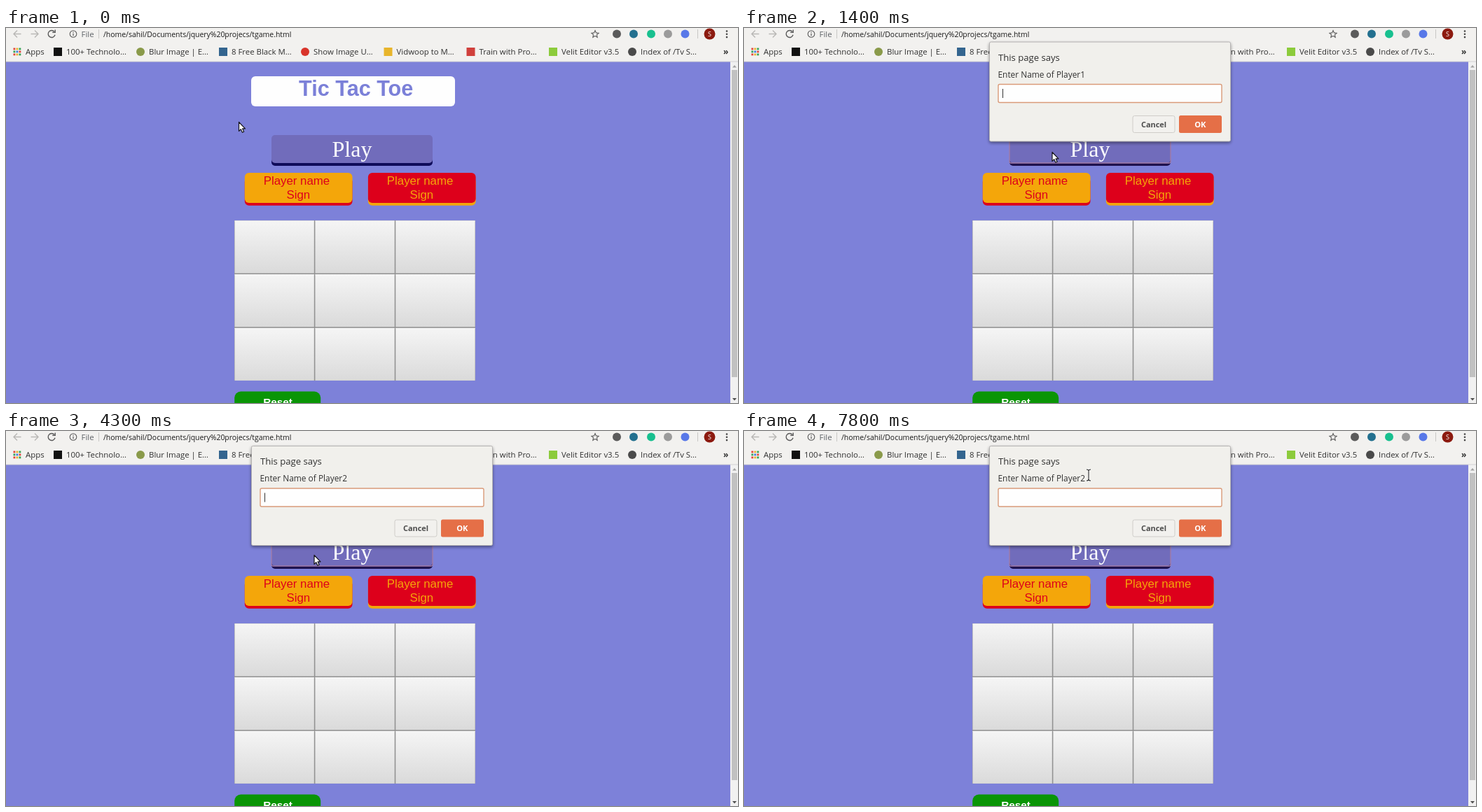
Recreate the animation shown at these times as an HTML page. Size 1045 by 536 pixels, loop 8000 ms.

```html
<!DOCTYPE html>
<html lang="en">
<head>
<meta charset="utf-8">
<title>Tic Tac Toe</title>
<style>
  html, body { margin: 0; width: 100%; height: 100%; overflow: hidden; background: #7d81d9; }
  svg { display: block; width: 100%; height: 100%; }
  text { white-space: pre; }
  .ui { font-family: "Open Sans", "Noto Sans", sans-serif; font-size: 11.4px; fill: #303030; }
  .sans { font-family: "Liberation Sans", Arial, sans-serif; }
  .serif { font-family: "Liberation Serif", Times, serif; }
  .mid { text-anchor: middle; }
  .bold { font-weight: 700; }
  .line { fill: none; stroke: #5a5a5a; stroke-width: 1.4; }
</style>
</head>
<body>
<svg viewBox="0 0 1045 536" preserveAspectRatio="none">
  <defs>
    <linearGradient id="cell" x2="0" y2="1">
      <stop stop-color="#f5f5f5"/><stop offset="1" stop-color="#dadada"/>
    </linearGradient>
    <filter id="soft" x="-5%" y="-10%" width="110%" height="125%">
      <feGaussianBlur stdDeviation="2"/>
    </filter>
  </defs>

  <!-- page -->
  <rect width="1045" height="536" fill="#7d81d9"/>
  <rect x="350" y="69" width="291" height="43" rx="6" fill="#fefefe"/>
  <text class="sans bold mid" x="499.7" y="97" font-size="30.6" fill="#7b80d8">Tic Tac Toe</text>

  <rect id="edge" x="379" y="160" width="230" height="37" rx="5"/>
  <rect x="379" y="153" width="230" height="40" rx="5" fill="#716cbb"/>
  <rect id="ring" x="379" y="153" width="230" height="40" rx="2" fill="none" stroke="#a17ca9" stroke-width="1.4"/>
  <text class="serif mid" x="494" y="184" font-size="32" fill="#fff">Play</text>

  <g id="cards"></g>
  <g id="board"></g>

  <rect x="326.2" y="519.6" width="123" height="40" rx="9" fill="#0a9506"/>
  <text class="sans bold mid" x="388" y="539.5" font-size="15.3" fill="#fff">Reset</text>

  <!-- scrollbar -->
  <rect x="1034" y="48" width="11" height="488" fill="#f1f1f1"/>
  <rect x="1036" y="60" width="8" height="439" fill="#c1c1c1"/>
  <path d="M1037 56.5h6l-3-3.4z" fill="#a3a3a3"/>
  <path d="M1037 529h6l-3 3.4z" fill="#505050"/>

  <!-- browser bars -->
  <rect width="1045" height="48" fill="#f2f1ef"/>
  <rect y="47.5" width="1045" height="1" fill="#d3d1d4"/>
  <g class="line">
    <path d="M21.5 8.5H11.5M16 3.5l-5 5 5 5M35.5 8.5H45.5M41 3.5l5 5-5 5" stroke="#b9b8b6"/>
    <path d="M69 5.2a5 5 0 1 0 1 4.6M70.2 2.4v4h-4"/>
    <circle cx="96" cy="8.5" r="4.8" stroke-width="1.1"/>
    <path d="M96 7.8v3.4M96 5.4v1.3" stroke-width="1.2"/>
    <path d="M132.5 2v13M987.5 2v13" stroke="#c8c7c5" stroke-width="1"/>
    <path d="M841 3.6l1.5 3.3 3.6.4-2.7 2.4.8 3.6-3.2-1.9-3.2 1.9.8-3.6-2.7-2.4 3.6-.4z" stroke-width="1.1"/>
  </g>
  <text class="ui" x="107.5" y="12.5" style="fill:#5f6368">File</text>
  <text class="ui" x="139" y="12.5" style="font-size:10.45px;fill:#1a1a1a">/home/sahil/Documents/jquery%20projecs/tgame.html</text>
  <g id="tools"></g>
  <text class="ui mid" x="1004.5" y="11.8" style="font-size:9px;fill:#fff">S</text>
  <g fill="#444"><circle cx="1029" cy="4.5" r="1.3"/><circle cx="1029" cy="8.8" r="1.3"/><circle cx="1029" cy="13.1" r="1.3"/></g>
  <g id="marks"></g>
  <text class="ui bold" x="1024" y="37.5" style="font-size:12px">»</text>

  <!-- prompt -->
  <g id="dialog">
    <rect x="350" y="23" width="345" height="143" rx="3" fill="#000" opacity=".42" filter="url(#soft)"/>
    <rect x="350.5" y="21.5" width="344" height="142" rx="2" fill="#f1f0ec" stroke="#b5b3b3"/>
    <text class="ui" x="363" y="48" style="font-size:13.1px">This page says</text>
    <text class="ui" id="ask" x="362.5" y="72" style="font-size:11.9px"></text>
    <rect x="363" y="82" width="319" height="26" rx="2" fill="#fefefe" stroke="#d99a79" stroke-width="1.4"/>
    <text class="ui" id="typed" x="369" y="99" style="font-size:10.8px"></text>
    <rect id="caret" y="88.5" width="1" height="13" fill="#333"/>
    <rect x="555" y="127" width="60" height="24" rx="2.5" fill="#f2f1ee" stroke="#cfcdc9"/>
    <text class="ui bold mid" x="585" y="143" style="font-size:10.9px;fill:#4c4c4c">Cancel</text>
    <rect x="621" y="126.5" width="61" height="25" rx="2.5" fill="#e56f47"/>
    <text class="ui bold mid" x="651.3" y="143" style="font-size:11.2px;fill:#fff">OK</text>
  </g>

  <path id="arrow" d="M.5 .5V13.4L3.3 10.7L5.4 15.3L7.6 14.3L5.6 9.8H9.5Z" fill="#fff" stroke="#15151c" stroke-width="1.2" stroke-linejoin="round"/>
  <g id="beam" fill="none">
    <path d="M-3-8q3 0 3 2V6q0 2-3 2M3-8q-3 0-3 2M3 8q-3 0-3-2" stroke="#fff" stroke-width="2.4"/>
    <path d="M-3-8q3 0 3 2V6q0 2-3 2M3-8q-3 0-3 2M3 8q-3 0-3-2" stroke="#222" stroke-width="1.1"/>
  </g>
</svg>
<script>
const $ = id => document.getElementById(id);
const LOOP = 8000;

const rect = (x, y, w, h, fill, rx = 0) =>
  `<rect x="${x}" y="${y}" width="${w}" height="${h}" rx="${rx}" fill="${fill}"/>`;
const dot = (x, y, r, fill) => `<circle cx="${x}" cy="${y}" r="${r}" fill="${fill}"/>`;
const label = (x, y, s, fill) =>
  `<text class="sans mid" x="${x}" y="${y}" font-size="16.83" fill="${fill}">${s}</text>`;

const card = (x, face, ink) =>
  rect(x, 213.7, 153.7, 40, ink, 6) + rect(x, 206.9, 153.7, 43, face, 6) +
  label(x + 74.2, 224, "Player name", ink) + label(x + 76.5, 244, "Sign", ink);
$("cards").innerHTML = card(340.8, "#f4a60a", "#dd001b") + card(516.9, "#dd001b", "#f4a60a");

let cells = rect(326, 275, 344, 229, "#929292");
for (let i = 0; i < 9; i++) {
  const x = 326.5 + (i % 3) * 114.9, y = 275.5 + Math.floor(i / 3) * 76.7;
  cells += rect(x, y, 113.3, 75, "url(#cell)") + rect(x, y, 113.3, 1, "#fafafa");
}
$("board").innerHTML = cells;

$("tools").innerHTML = [
  [872, "#5b5b5b"], [896, "#23708f"], [921, "#18c08f"], [945, "#9b9b9b"], [969.5, "#5878e8"]
].map(([x, c]) => dot(x, 8.5, 6, c)).join("") + dot(1004.5, 8.5, 8, "#8c1a0f");

const round = (x, c) => dot(x, 34, 6, c);
const square = (x, c) => rect(x - 6, 28, 12, 12, c);
const marks = [
  [86, "100+ Technolo…", "#111", square], [204, "Blur Image | E…", "#8a9a4a", round],
  [322, "8 Free Black M…", "#34658f", square], [439, "Show Image U…", "#d9342b", round],
  [557.5, "Vidwoop to M…", "#e8b52c", square], [675.5, "Train with Pro…", "#d0403c", square],
  [793, "Velit Editor v3.5", "#8ccb3c", square], [906, "Index of /Tv S…", "#4a4a4a", round]
];
const hues = ["#e2463a", "#3d7de0", "#36a457", "#e9b32c"];
let bar = `<text class="ui" x="28" y="38">Apps</text>`;
for (let i = 0; i < 9; i++)
  bar += rect(10.5 + (i % 3) * 4, 28.5 + Math.floor(i / 3) * 4, 2.8, 2.8, hues[(i * 3 + (i / 3 | 0)) % 4]);
for (const [x, s, c, icon] of marks)
  bar += icon(x - 12, c) + `<text class="ui" x="${x}" y="38">${s}</text>`;
$("marks").innerHTML = bar;

// Each step: start time, then the values held from there on.
const pointer = [
  [0, 332, 134], [500, 387, 158], [700, 597, 181], [800, 439.5, 177],
  [6600, 598, 158], [6800, 570, 140], [6900, 536, 121],
  [7000, 500, 100, 1], [7100, 472, 85, 1], [7300, 468, 80, 1], [7400, 462, 72, 1],
  [7500, 458, 66, 1], [7600, 456, 63, 1], [7800, 492, 63, 1]
];
const prompts = [ // opacity, vertical shift, player
  [0, 0, 0, 1], [1300, .6, -9, 1], [1400, 1, -1.5, 1], [1600, 1, -.7, 1], [1700, 1, 0, 1],
  [4100, 1, -1.5, 1], [4200, .7, -8, 2], [4300, 1, 0, 2]
];
const typing = [[0, ""], [2700, "S"], [2900, "Sah"], [3000, "Sahi"], [3200, "Sahil"], [4200, ""]];
const blink = [[0, 1], [2200, 0], [2700, 1], [3700, 0], [4200, 1], [5600, 0], [6400, 1], [6600, 0], [7000, 1], [7500, 0]];

const at = (steps, t) => steps.filter(s => s[0] <= t).pop().slice(1);
const show = (el, on) => el.setAttribute("visibility", on ? "visible" : "hidden");

function draw(t) {
  const [x, y, beam] = at(pointer, t);
  for (const [id, on] of [["arrow", !beam], ["beam", beam]]) {
    $(id).setAttribute("transform", `translate(${x} ${y})`);
    show($(id), on);
  }
  const pressed = t >= 1100;
  show($("ring"), pressed);
  $("edge").setAttribute("fill", pressed ? "#1e124e" : "#0f0c5a");

  const [alpha, dy, player] = at(prompts, t);
  $("dialog").setAttribute("opacity", alpha);
  $("dialog").setAttribute("transform", `translate(0 ${dy})`);
  $("ask").textContent = "Enter Name of Player" + player;
  const [name] = at(typing, t);
  $("typed").textContent = name;
  $("caret").setAttribute("x", Math.round(369 + (name ? $("typed").getComputedTextLength() : 0)));
  $("caret").setAttribute("opacity", at(blink, t)[0]);
}

function tick() {
  draw(performance.now() % LOOP);
  requestAnimationFrame(tick);
}
tick();
</script>
</body>
</html>
```
